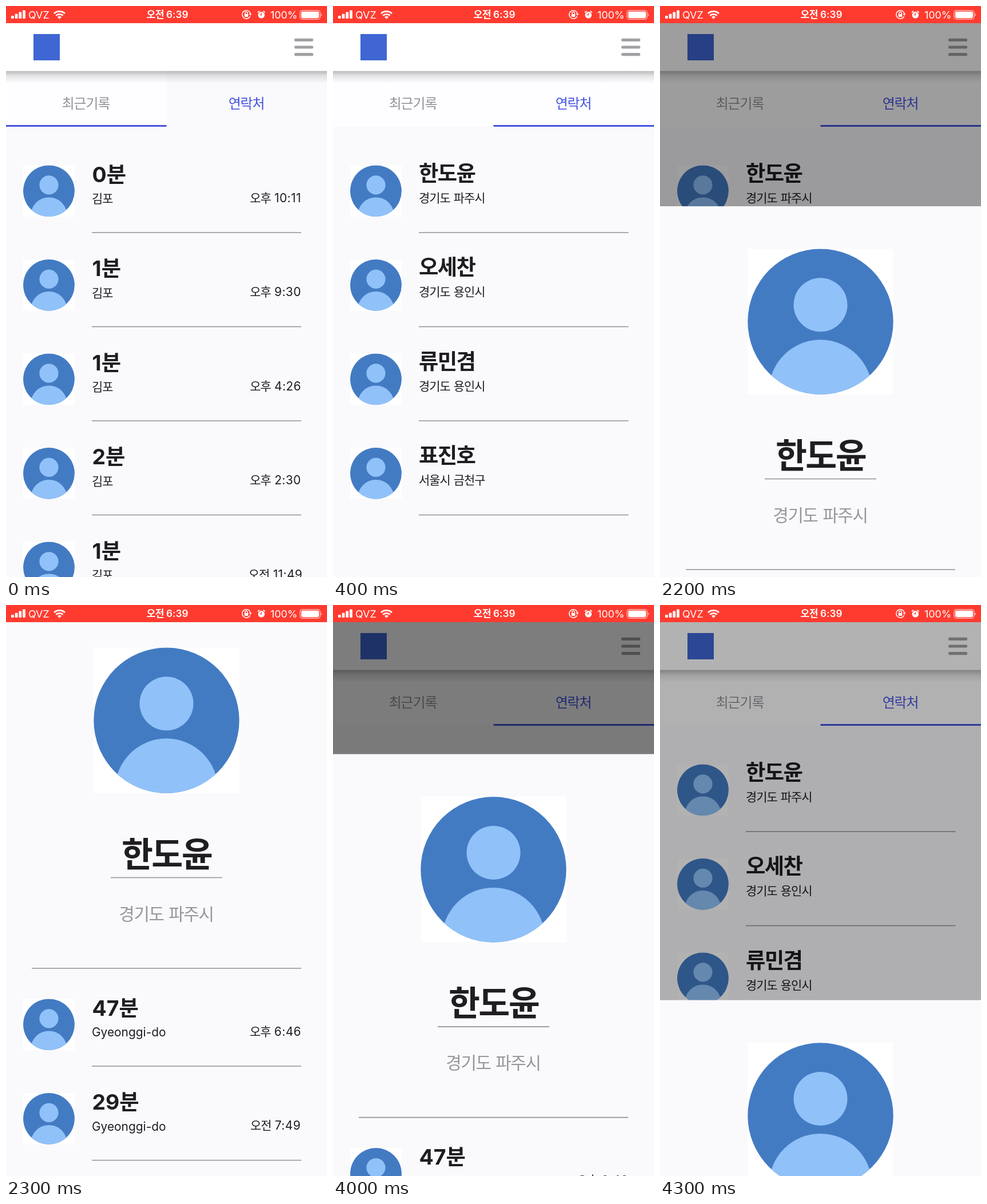
Animation of 561 by 998 pixels, one loop 4400 ms. Source, as an HTML page:

```html
<!DOCTYPE html>
<html lang="ko">
<head>
<meta charset="utf-8">
<title>Contacts</title>
<style>
  html, body { margin: 0; width: 100%; height: 100%; overflow: hidden; background: #faf9fc; }
  svg { display: block; width: 100%; height: 100%; }
  text { font-family: Inter, "Noto Sans CJK KR", "Noto Sans CJK", sans-serif; fill: #1f1d22; }
  .ko { letter-spacing: -.045em; }
  .title { font-size: 37.4px; font-weight: 700; }
  .small { font-size: 20.9px; }
  .time { letter-spacing: .02em; }
  .tab { font-size: 23.9px; }
  .status { font-size: 17.9px; fill: #fff; }
  .clock { font-size: 17.2px; font-weight: 600; }
  .mid { text-anchor: middle; }
  .rule { stroke: #929095; stroke-width: 1.6; }
</style>
</head>
<body>
<svg id="stage" viewBox="0 0 561 998" preserveAspectRatio="none"></svg>
<script>
const LOOP = 4400, W = 561, H = 998, PITCH = 164.5, BG = '#faf9fc';

const rect = (x, y, w, h, fill, extra = '') =>
  `<rect x="${x}" y="${y}" width="${w}" height="${h}" fill="${fill}" ${extra}/>`;

// Hangul runs are set slightly tighter than Latin and digits
const text = (x, y, cls, str, extra = '') =>
  `<text x="${x}" y="${y}" class="${cls}" ${extra}>${
    str.replace(/[가-힣]+/g, run => `<tspan class="ko">${run}</tspan>`)}</text>`;

const rule = (x1, x2, y) => `<line class="rule" x1="${x1}" x2="${x2}" y1="${y}" y2="${y}"/>`;

const avatar = (x, y, size) =>
  `<use href="#avatar" x="${x}" y="${y}" width="${size}" height="${size}"/>`;

const contactRow = ([name, place], i) => `<g transform="translate(0 ${i * PITCH})">
  ${avatar(30, 278.3, 90)}${text(150, 305.5, 'title', name)}
  ${text(150, 342.5, 'small', place)}${rule(150, 516.5, 396)}</g>`;

const callRow = ([length, place, time], i, top = 0) => `<g transform="translate(0 ${top + i * PITCH})">
  ${avatar(30, 278.3, 90)}${text(150.5, 307.6, 'title', length)}
  ${text(150, 344, 'small', place)}${text(471, 342.5, 'small time mid', time)}
  ${rule(150, 516, 396)}</g>`;

const recents = [
  ['0분', '김포', '오후 10:11'], ['1분', '김포', '오후 9:30'], ['1분', '김포', '오후 4:26'],
  ['2분', '김포', '오후 2:30'], ['1분', '김포', '오전 11:49'],
];
const contacts = [
  ['한도윤', '경기도 파주시'], ['오세찬', '경기도 용인시'],
  ['류민겸', '경기도 용인시'], ['표진호', '서울시 금천구'],
];
const calls = [['47분', 'Gyeonggi-do', '오후 6:46'], ['29분', 'Gyeonggi-do', '오전 7:49']];

const defs = `<defs>
  <symbol id="avatar" viewBox="0 0 255 255">
    <clipPath id="disc"><circle cx="127.5" cy="127.5" r="127.2"/></clipPath>
    ${rect(0, 0, 255, 255, '#fff')}
    <circle cx="127.5" cy="127.5" r="127.2" fill="#437bc3"/>
    <g fill="#90c2f9" clip-path="url(#disc)">
      <circle cx="127.5" cy="98" r="47"/><circle cx="127.5" cy="249" r="90"/>
    </g>
  </symbol>
  <linearGradient id="shade" x2="0" y2="1">
    <stop offset="0" stop-color="#000" stop-opacity=".27"/>
    <stop offset=".4" stop-color="#000" stop-opacity=".1"/>
    <stop offset="1" stop-color="#000" stop-opacity="0"/>
  </linearGradient>
</defs>`;

const lists = `<g id="lists">
  ${recents.map((r, i) => callRow(r, i)).join('')}
  <g transform="translate(${W} 0)">${contacts.map(contactRow).join('')}</g>
</g>`;

const tabs = rect(0, 114, W, 97, '#fefdff') +
  rect(280.5, 114, 280.5, 97, '#faf9fc', 'id="press"') +
  text(139.5, 178.5, 'tab mid', '최근기록', 'style="fill:#949297"') +
  text(420, 178.5, 'tab mid', '연락처', 'style="fill:#4453e0"') +
  rect(0, 208, 280.5, 3, '#4453e0', 'id="marker"');

const header = rect(0, 113.4, W, 22, 'url(#shade)') + rect(0, 30, W, 83.4, '#fff') +
  rect(48, 49, 46, 46, '#3f66d3') +
  [56.8, 69.4, 82].map(y => rect(504, y, 33, 5.2, '#a3a0a5', 'rx="2"')).join('');

const panel = `<g id="panel">
  ${rect(0, 0, W, H, BG)}${avatar(153, 74.3, 255)}
  ${text(280.5, 457.5, 'mid', contacts[0][0], 'font-size="59.8" font-weight="700"')}
  ${rule(183, 378, 476.5)}
  ${text(280, 550.5, 'mid', contacts[0][1], 'font-size="29.9" style="fill:#98969a"')}
  ${rule(45, 516, 635)}
  ${calls.map((c, i) => callRow(c, i, 410)).join('')}
</g>`;

const statusBar = rect(0, 0, W, 30, '#ff3b30') +
  [0, 1, 2, 3].map(i => rect(9 + i * 6.7, 17 - i * 3.2, 4.8, 5 + i * 3.2, '#fff', 'rx="1"')).join('') +
  text(39, 21.5, 'status', 'QVZ') +
  `<g fill="none" stroke="#fff" stroke-width="2.8">
    <path d="M84 13.2a13.8 13.8 0 0 1 19 0M87.4 16.8a8.8 8.8 0 0 1 12.2 0"/>
  </g><path d="M90 19.2a5 5 0 0 1 7 0L93.5 22.8z" fill="#fff"/>` +
  text(282, 21.3, 'status clock mid', '오전 6:39') +
  `<g fill="none" stroke="#fff" stroke-width="1.5">
    <path d="M426.6 18a7.2 7.2 0 1 1 .5-4.5M417.8 14.5v-2a2.2 2.2 0 0 1 4.4 0v2"/>
    <path d="M440.2 11.6a5 5 0 0 1 3-2.8M452.4 11.6a5 5 0 0 0-3-2.8" stroke-width="1.8"/>
  </g>
  <path d="M424.5 13.5h5l-2.5 3.5z" fill="#fff"/>${rect(416.7, 14, 6.6, 5, '#fff', 'rx=".8"')}
  <circle cx="446.3" cy="15.8" r="5.8" fill="#fff"/>
  <path d="M446.3 12v4l-2.8-1.2" fill="none" stroke="#ff3b30" stroke-width="1.2"/>` +
  text(462, 21.5, 'status', '100%') +
  rect(514, 7.8, 35, 15.4, 'none', 'rx="4" stroke="#fff" stroke-opacity=".75" stroke-width="1.2"') +
  rect(516, 9.8, 31, 11.4, '#fff', 'rx="2.4"') +
  '<path d="M550.7 13q2.2 2.5 0 5z" fill="#fff"/>';

document.getElementById('stage').innerHTML = defs + rect(0, 0, W, H, BG) + lists + tabs + header +
  rect(0, 30, W, H - 30, '#000', 'id="dim"') + panel + statusBar;

const $ = id => document.getElementById(id);
const [listsEl, marker, press, dim, panelEl] = ['lists', 'marker', 'press', 'dim', 'panel'].map($);

// Linear interpolation through [time, value] points
function track(t, points) {
  if (t <= points[0][0]) return points[0][1];
  for (let i = 1; i < points.length; i++) {
    const [t0, a] = points[i - 1], [t1, b] = points[i];
    if (t <= t1) return a + (b - a) * (t - t0) / (t1 - t0);
  }
  return points[points.length - 1][1];
}

const panelTop = [[2000, 998], [2100, 996], [2200, 350], [2300, 0], [3700, 0], [3800, 66], [4000, 260.6], [4300, 690.6]];
const dimming = [[2100, 0], [2200, .38], [2300, .56], [3700, .56], [3800, .54], [4000, .51], [4300, .3]];

function draw(ms) {
  const t = Math.floor(ms % LOOP / 100) * 100;  // the screen refreshes ten times a second
  const p = Math.min(t / 400, 1), slide = p * p * (3 - 2 * p);
  listsEl.setAttribute('transform', `translate(${-W * slide} 0)`);
  marker.setAttribute('x', 280.5 * slide);
  press.setAttribute('opacity', t < 100 ? 1 : 0);
  dim.setAttribute('opacity', track(t, dimming));
  panelEl.setAttribute('transform', `translate(0 ${track(t, panelTop)})`);
}

const start = performance.now();
function tick() {
  draw(performance.now() - start);
  requestAnimationFrame(tick);
}
tick();
</script>
</body>
</html>
```
